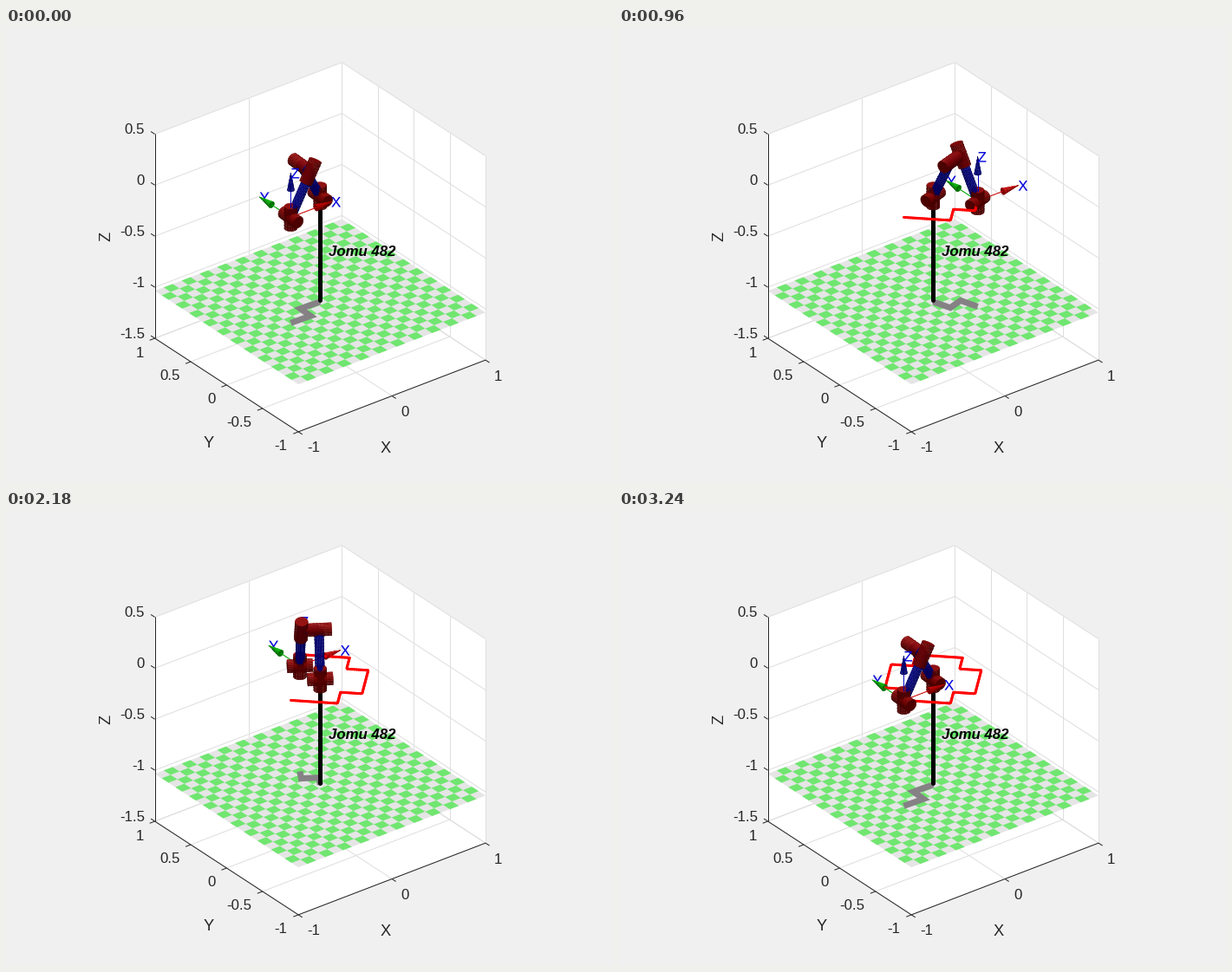
Animation of 700x525 px, one loop 3340 ms. Source, as a matplotlib script:

```python
import numpy as np
import matplotlib.pyplot as plt
from matplotlib.animation import FuncAnimation
from matplotlib.collections import LineCollection, PolyCollection
from matplotlib.textpath import TextPath

W, H, DPI = 700, 525, 100
FRAMES, MOVING = 167, 158
PX = 72 / DPI
FONT = "Liberation Sans"
INK = "#262626"

# Orthographic camera
AZ, EL, SCALE = np.radians(37.5), np.radians(30), 136
CENTER = np.array([362.3, 193.9])
RIGHT = np.array([np.cos(AZ), -np.sin(AZ), 0])
UP = np.array([np.sin(AZ) * np.sin(EL), np.cos(AZ) * np.sin(EL), np.cos(EL)])
EYE = np.cross(RIGHT, UP)

# Arm dimensions
ARM, OFFSET, FLOOR = 0.4318, 0.15, -1.035
JOINT_R, JOINT_HALF, LINK_R = 0.055, 0.106, 0.039
AXIS_LEN, CONE_LEN, CONE_R = 0.433, 0.165, 0.03

RED = np.array([[62, 0, 0], [80, 6, 6]]) / 255
BLUE = np.array([[0, 0, 84], [12, 12, 62]]) / 255
CONES = [
    np.array([[110, 0, 0], [90, 0, 0]]) / 255,
    np.array([[0, 95, 0], [0, 90, 0]]) / 255,
    np.array([[0, 0, 85], [0, 0, 70]]) / 255,
]
AXIS_COLORS = [(0.8, 0, 0), (0, 0.65, 0), (0, 0, 0.75)]
LABEL_COLOR = (0, 0, 0.86)


def project(p):
    p = np.asarray(p, float)
    return CENTER + SCALE * np.stack([p @ RIGHT, -(p @ UP)], axis=-1)


def unit(v):
    return v / np.linalg.norm(v)


def glyph(ch, size=16.7):
    pts = TextPath((0, 0), ch, size=size, prop={"family": FONT}).to_polygons()[0]
    return pts * [1, -1] + [0, size * 0.36]


GLYPHS = [glyph(c) for c in "XYZ"]


def tool_path():
    """Corners of the plus-shaped outline, turned by 45 degrees."""
    b, a, c = 0.2, 0.385, 0.39
    half = np.array([(-b, -c), (b, -c), (b, -b), (a, -b), (a, b), (b, b)])
    uv = np.vstack([half, -half, half[:1]])
    u, v = uv.T
    corners = np.column_stack([u + v, v - u, 0 * u]) / np.sqrt(2)
    dist = np.r_[0, np.cumsum(np.linalg.norm(np.diff(corners, axis=0), axis=1))]
    s = np.linspace(0, dist[-1], MOVING + 1)
    return np.column_stack([np.interp(s, dist, col) for col in corners.T])


PATH = tool_path()


class Scene:
    """Collects flat pieces and hands them out from back to front."""

    def __init__(self):
        self.verts, self.depth, self.colors, self.widths = [], [], [], []

    def add(self, pts, depth, color, width=0.5 * PX):
        self.verts.append(pts)
        self.depth.append(depth)
        self.colors.append((*color, 1))
        self.widths.append(width)

    def line(self, pts, color, px):
        flat, depth = project(pts), pts @ EYE
        for i in range(len(pts) - 1):
            self.add(flat[i:i + 2], (depth[i] + depth[i + 1]) / 2, color, px * PX)

    def tube(self, a, b, r0, r1, color, n=28):
        axis = b - a
        length = np.linalg.norm(axis)
        axis = axis / length
        side = unit(np.cross(axis, [0, 0, 1] if abs(axis[2]) < 0.9 else [1, 0, 0]))
        other = np.cross(axis, side)

        def around(t):
            return np.outer(np.cos(t), side) + np.outer(np.sin(t), other)

        edge = np.linspace(0, 2 * np.pi, n + 1)
        ring = around(edge)
        normals = around(edge[:-1] + np.pi / n) + axis * (r0 - r1) / length
        m = max(2, int(length / 0.028))
        t = np.linspace(0, 1, m + 1)[:, None, None]
        grid = a + t * (b - a) + (r0 + t * (r1 - r0)) * ring
        quads = np.stack(
            [grid[:-1, :-1], grid[:-1, 1:], grid[1:, 1:], grid[1:, :-1]], axis=2)
        flat, depth = project(quads), quads.mean(axis=2) @ EYE
        for j in np.flatnonzero(normals @ EYE > 0):
            tone = shade(normals[j], color)
            for i in range(m):
                self.add(flat[i, j], depth[i, j], tone)
        for end, r, way in ((a, r0, -axis), (b, r1, axis)):
            if r > 0 and way @ EYE > 0:
                self.add(project(end + r * ring), end @ EYE, shade(way, color))

    def sorted(self):
        order = np.argsort(self.depth, kind="stable")
        return ([self.verts[i] for i in order],
                np.array(self.colors)[order], np.array(self.widths)[order])


def shade(normal, color):
    n = unit(normal)
    light = 0.75 * max(0, n[2]) + 0.25 * max(0, n @ EYE)
    gloss = 0.1 * light ** 6
    return np.clip(color[0] + light * color[1] + gloss, 0, 1)


def solve_arm(tool):
    """Elbow, offset elbow and the shoulder axis for a tool point at z = 0."""
    r = np.hypot(tool[0], tool[1])
    turn = np.arctan2(tool[1], tool[0]) - np.arcsin(OFFSET / r)
    reach = np.sqrt(r * r - OFFSET ** 2) / 2
    ahead = np.array([np.cos(turn), np.sin(turn), 0])
    across = np.array([-np.sin(turn), np.cos(turn), 0])
    elbow = reach * ahead + np.array([0, 0, np.sqrt(ARM ** 2 - reach ** 2)])
    return elbow, elbow + OFFSET * across, across


def build(k):
    k = min(k, MOVING)
    base, up, tool = np.zeros(3), np.array([0, 0, 1.0]), PATH[k]
    elbow, fore, across = solve_arm(tool)
    scene = Scene()

    scene.line(np.linspace([0, 0, -1.02], [0, 0, 0], 40), (0, 0, 0), 5)
    if k:
        scene.line(PATH[:k + 1], (1, 0, 0), 3)

    for a, b in ((base, elbow), (elbow, fore), (fore, tool)):
        scene.tube(a, b, LINK_R, LINK_R, BLUE, 20)

    joints = ((base, up), (base, across), (elbow, across),
              (fore, unit(tool - fore)), (tool, across), (tool, up))
    for pos, axis in joints:
        d = JOINT_HALF * axis
        scene.tube(pos - d, pos + d, JOINT_R, JOINT_R, RED)

    for d, color, cone, letter in zip(np.eye(3), AXIS_COLORS, CONES, GLYPHS):
        tip = tool + AXIS_LEN * d
        neck = tip - CONE_LEN * d
        scene.line(np.linspace(tool, neck, 12), color, 1)
        scene.tube(neck, tip, CONE_R, 0, cone, 16)
        scene.add(project(tip) + letter, tip @ EYE, LABEL_COLOR, 0.1)

    shadow = np.array([base, elbow, fore, tool])
    shadow[:, 2] = FLOOR
    return scene, project(shadow)


fig = plt.figure(figsize=(W / DPI, H / DPI), dpi=DPI, facecolor="#f0f0f0")
ax = fig.add_axes([0, 0, 1, 1])
ax.set_xlim(0, W)
ax.set_ylim(H, 0)
ax.axis("off")


def label(x, y, s, size=16.7, **kw):
    kw = {"ha": "center", "color": INK, **kw}
    ax.text(x, y, s, fontsize=size * PX, family=FONT, va="baseline", zorder=5, **kw)


def draw_box():
    lo, hi = -1.5, 0.5
    walls = [
        [(-1, 1, lo), (1, 1, lo), (1, 1, hi), (-1, 1, hi)],
        [(1, 1, lo), (1, -1, lo), (1, -1, hi), (1, 1, hi)],
        [(-1, -1, lo), (1, -1, lo), (1, 1, lo), (-1, 1, lo)],
    ]
    ax.add_collection(PolyCollection(project(walls), facecolors="w", edgecolors="w",
                                     linewidths=0.3, zorder=0))
    grid = []
    for x in (-1, 0, 1):
        grid += [[(x, 1, lo), (x, 1, hi)], [(x, -1, lo), (x, 1, lo)]]
    for y in np.linspace(-1, 1, 5):
        grid += [[(1, y, lo), (1, y, hi)], [(-1, y, lo), (1, y, lo)]]
    for z in np.linspace(lo, hi, 5):
        grid += [[(-1, 1, z), (1, 1, z)], [(1, 1, z), (1, -1, z)]]
    ax.add_collection(LineCollection(project(grid), colors="#dedede",
                                     linewidths=PX, zorder=1))

    edges = [[(-1, 1, hi), (-1, 1, lo)], [(-1, 1, lo), (-1, -1, lo)],
             [(-1, -1, lo), (1, -1, lo)]]
    t = 0.055
    for x in (-1, 0, 1):
        edges.append([(x, -1, lo), (x, -1 - t, lo)])
        px, py = project((x, -1, lo))
        label(px + 10, py + 23.5, f"{x:g}", ha="left")
    for y in np.linspace(-1, 1, 5):
        edges.append([(-1, y, lo), (-1 - t, y, lo)])
        px, py = project((-1, y, lo))
        label(px - 12.5, py + 21.5, f"{y:g}", ha="right")
    for z in np.linspace(lo, hi, 5):
        edges.append([(-1, 1, z), (-1, 1 + t, z)])
        px, py = project((-1, 1, z))
        label(px - 11.5, py - 0.5, f"{z:g}", ha="right")
    ax.add_collection(LineCollection(project(edges), colors=INK,
                                     linewidths=PX, zorder=3.5))
    label(438, 490.5, "X", 18.3)
    label(234, 484.5, "Y", 18.3)
    label(120.5, 240, "Z", 18.3, rotation=90, rotation_mode="anchor")


def draw_floor(n=21):
    def tile(x0, y0, x1, y1):
        return [(x0, y0, FLOOR), (x1, y0, FLOOR), (x1, y1, FLOOR), (x0, y1, FLOOR)]

    e = np.linspace(-1, 1, n + 1)
    green = [tile(e[i], e[j], e[i + 1], e[j + 1])
             for i in range(n) for j in range(n) if (i + j) % 2]
    for quads, color in (([tile(-1, -1, 1, 1)], "#e5e5e5"), (green, "#70e670")):
        ax.add_collection(PolyCollection(project(quads), facecolors=color,
                                         edgecolors="none", zorder=2))


draw_box()
draw_floor()
label(372, 263, "Jomu 482", ha="left", color="k", weight="bold", style="italic")
shade_line, = ax.plot([], [], color="#858185", lw=7 * PX, zorder=3,
                      solid_capstyle="butt", solid_joinstyle="miter")
solids = PolyCollection([], closed=False, capstyle="round", zorder=4)
ax.add_collection(solids, autolim=False)


def update(k):
    scene, shadow = build(k)
    verts, colors, widths = scene.sorted()
    solids.set_verts(verts, closed=False)
    solids.set_facecolor(colors)
    solids.set_edgecolor(colors)
    solids.set_linewidth(widths)
    shade_line.set_data(*shadow.T)
    return solids, shade_line


anim = FuncAnimation(fig, update, frames=FRAMES, interval=20,
                     init_func=lambda: update(0), repeat=True, repeat_delay=0)
plt.show()
```
